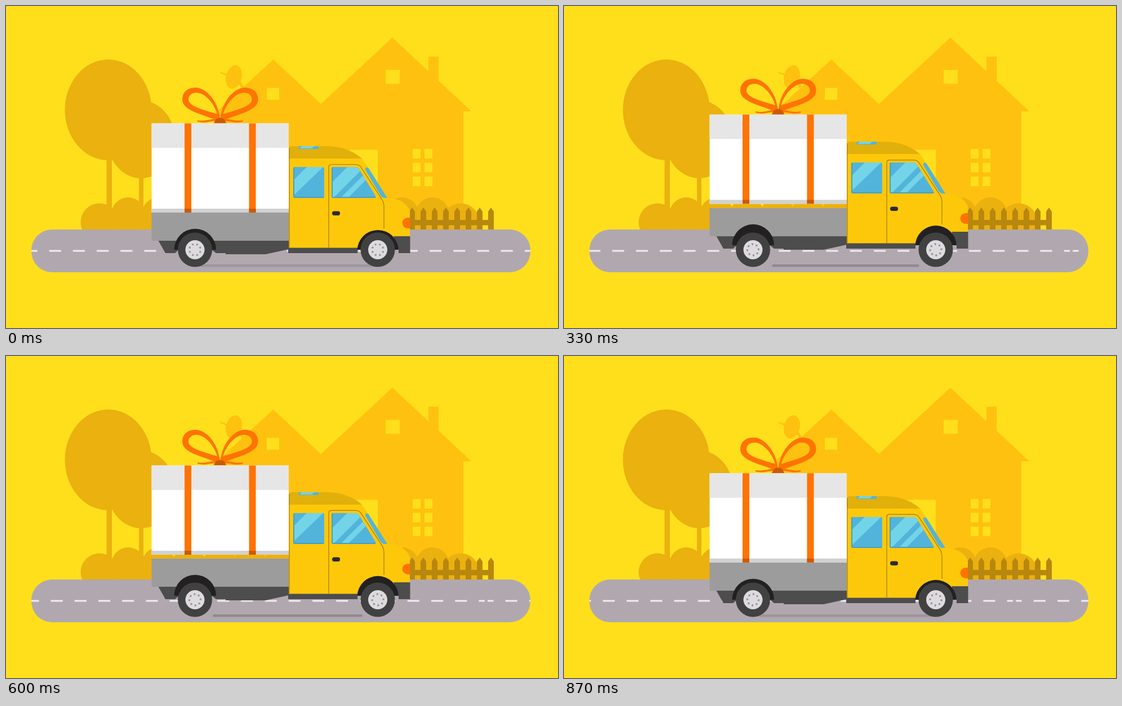
An HTML page for the animation above (0.9 s loop, 980 by 572 pixels).

```html
<!DOCTYPE html>
<html lang="en">
<head>
<meta charset="utf-8">
<title>Delivery truck</title>
<style>
  html, body { margin: 0; width: 100%; height: 100%; overflow: hidden; background: #ffdf1c; }
  svg { display: block; width: 980px; height: 572px; }
  .house { fill: #ffc10f; }
  .lit { fill: #ffdf1c; }
  .plant { fill: #eab10f; }
  .fence { fill: #b8870d; }
  .orange { fill: #ff7300; }
  .rust { fill: #cc5a00; }
  .dark { fill: #4d4d4d; }
  .arch { fill: #222021; }
  .body { fill: #fec80a; }
  .glass { fill: #52b4da; }
  .shine { fill: #73d4e8; }
  .seam { fill: none; stroke: #a17c0c; stroke-width: 1.2; }
  .dash { stroke: #f0ecf1; stroke-width: 3; }
</style>
</head>
<body>
<svg viewBox="0 0 980 572">
  <defs>
    <clipPath id="roadClip"><rect x="45" y="397" width="886" height="76" rx="37"/></clipPath>
    <clipPath id="rearClip"><rect x="510" y="286" width="55" height="55" rx="3"/></clipPath>
    <clipPath id="frontClip"><path id="frontPane" d="M581 286H619Q624 286 627 290L656 337Q658 341 654 341H581Q578 341 578 338V289Q578 286 581 286Z"/></clipPath>
    <g id="loop">
      <path class="orange" fill-rule="evenodd" d="M380 202C377 166 353 145 337 145C321 145 313 154 313 166C313 186 346 191 374 203Z
        M375 192C369 171 352 154 338 154C329 154 324 159 324 166C324 178 349 184 375 192Z"/>
      <path class="orange" d="M380 201C367 198 357 206 340 203Q339 205 342 206C358 209 366 202 380 205Z"/>
    </g>
    <g id="wheel">
      <circle r="30.5" fill="#414141"/>
      <circle r="17" fill="#dddbde"/>
    </g>
  </defs>

  <g class="house">
    <path d="M366 195L474.5 95L559 174L686 56L826 187H812V397H380V195Z"/>
    <rect x="750" y="90" width="18" height="50"/>
    <ellipse cx="404.5" cy="126" rx="14" ry="21" transform="rotate(14 404.5 126)"/>
    <path d="M381 117L393 121V124L380 119ZM413 138L417 135L424 146H418Z"/>
  </g>
  <g class="lit" id="panes">
    <rect x="463" y="145.500" width="22" height="21"/>
    <rect x="674" y="113.500" width="25" height="24.500"/>
    <rect x="600" y="255.500" width="60" height="100"/>
  </g>
  <g class="plant" id="plants">
    <ellipse cx="181.500" cy="184.500" rx="77" ry="89.500"/>
    <ellipse cx="240" cy="237" rx="60" ry="69"/>
    <rect x="178.500" y="260" width="9.500" height="120"/>
    <rect x="236" y="295" width="8" height="90"/>
    <circle cx="166" cy="384" r="33.500"/>
    <circle cx="807" cy="384" r="33.500"/>
    <rect x="140" y="370" width="690" height="27"/>
  </g>
  <g class="fence" id="fence"><rect x="716" y="380" width="150" height="9.500"/></g>

  <g clip-path="url(#roadClip)">
    <rect x="45" y="397" width="886" height="76" fill="#b1a8af"/>
    <g id="dashes">
      <path class="dash" d="M45 435H931.500"/>
      <path class="dash" d="M936.500 435H1823"/>
    </g>
  </g>
  <rect id="shadow" y="459" height="4.500" rx="1" fill="#8f8b90"/>

  <g id="truck">
    <path class="dark" d="M270 416H502V432L461 441H390V439H373L335 410L300 439H283Z"/>
    <rect x="258.500" y="367" width="243.500" height="50" fill="#9c9c9c"/>
    <path class="body" d="M502 430V255Q502 249 508 249H573Q608 250 632 271L643 287L677 341Q708 342 717 364V410H690L624 430Z"/>
    <path d="M502 271V255Q502 249 508 249H573Q608 250 632 271Z" fill="#e1b00a"/>
    <path class="seam" d="M503 252V429"/>
    <path class="dark" d="M501 429.500H624V439H501ZM688 409H717.500V439H697V433Z"/>
    <path class="orange" d="M717.500 376H713A9.500 9.500 0 0 0 713 395H717.500Z"/>
    <rect class="glass" x="519.500" y="249" width="35.500" height="5"/>
    <path class="shine" d="M525 249H547L543 253H521Z"/>
    <path class="seam" d="M573 429V286Q573 281.500 578 281.500H620Q627 281.500 630 286L667 343Q671 349 671 356V396"/>
    <g clip-path="url(#rearClip)">
      <rect class="glass" x="510" y="286" width="55" height="55"/>
      <path class="shine" d="M534 286H563L510 337V310Z"/>
      <path d="M511 286V340H565" fill="none" stroke="#459fc6" stroke-width="2"/>
    </g>
    <g clip-path="url(#frontClip)">
      <rect class="glass" x="578" y="286" width="82" height="55"/>
      <path class="shine" d="M606 286H626L631 291L581 341H578V314ZM636 299L641 307L607 341H594Z"/>
      <path d="M579 286V340H658" fill="none" stroke="#459fc6" stroke-width="2"/>
    </g>
    <path class="glass" d="M638 287H643L677 341H671Q667 340 664 335L638 291Z"/>
    <rect x="579" y="364.500" width="14" height="7.500" rx="3.500" fill="#2d292c"/>
    <path class="arch" d="M298.500 433a37 37 0 0 1 74.500 0ZM623.500 433a36.800 37 0 0 1 73.500 0Z"/>
  </g>

  <g id="gift">
    <use href="#loop"/>
    <use href="#loop" transform="matrix(-1 0 0 1 760.500 0)"/>
    <path class="rust" d="M369 209Q371 198.500 380 198.500T391 209Z"/>
    <rect x="258.500" y="208.500" width="243.500" height="158.500" fill="#fff"/>
    <rect x="258.500" y="208.500" width="243.500" height="43.500" fill="#e6e6e6"/>
    <rect x="258.500" y="360" width="243.500" height="7" fill="#d1d1d1"/>
    <path class="orange" d="M317 208.500H329V367H317ZM431.500 208.500H443.500V367H431.500Z"/>
    <path class="rust" d="M317 360H329V367H317ZM431.500 360H443.500V367H431.500Z"/>
  </g>

  <g id="wheels"></g>
</svg>
<script>
  const LOOP = 900, STEP = 30;
  const PERIOD = 886.5 / 21;
  const $ = id => document.getElementById(id);

  function add(parent, tag, attrs) {
    const el = document.createElementNS('http://www.w3.org/2000/svg', tag);
    for (const key in attrs) el.setAttribute(key, attrs[key]);
    return parent.appendChild(el);
  }

  for (const x of [722, 743])
    for (const y of [254, 278.5, 303])
      add($('panes'), 'rect', { x, y, width: 14, height: 17 });

  for (let i = 0; i <= 10; i++)
    add($('plants'), 'circle', { cx: 217 + 54 * i, cy: 370, r: 30 });

  for (let i = 0; i < 8; i++)
    add($('fence'), 'path', { d: `M${716 + 20 * i} 397v-32l5-7l5 7v32z` });

  // Each line starts and ends on half a dash.
  for (const line of document.querySelectorAll('.dash')) {
    line.setAttribute('stroke-dasharray', PERIOD / 2);
    line.setAttribute('stroke-dashoffset', PERIOD / 4);
  }

  const hubs = [335.5, 660].map(x => {
    const wheel = add($('wheels'), 'g', { transform: `translate(${x} 433)` });
    add(wheel, 'use', { href: '#wheel' });
    const hub = add(wheel, 'g', { fill: '#99959a' });
    for (let i = 0; i < 8; i++) {
      const a = (i + 0.5) * Math.PI / 4;
      add(hub, 'circle', { cx: 10 * Math.cos(a), cy: 10 * Math.sin(a), r: 1.8 });
    }
    return hub;
  });

  const smooth = x => x * x * (3 - 2 * x);
  // Distance driven while speed settles toward its limit.
  const travel = t => 0.202 * (t - 208 * (1 - Math.exp(-t / 208)));

  function draw(t) {
    const lift = smooth(1 - Math.abs(2 * t / LOOP - 1));
    const road = travel(t);
    const half = 155 - 30 * lift;
    $('truck').setAttribute('transform', `translate(0 ${-9.6 * lift})`);
    $('gift').setAttribute('transform', `translate(0 ${-19 * lift})`);
    $('dashes').setAttribute('transform', `translate(${-road} 0)`);
    $('shadow').setAttribute('x', 500 - half);
    $('shadow').setAttribute('width', 2 * half);
    $('shadow').setAttribute('opacity', Math.min(1, 0.6 + 0.8 * lift));
    const angle = road / 30.5 * 180 / Math.PI;
    for (const hub of hubs) hub.setAttribute('transform', `rotate(${angle})`);
  }

  const start = performance.now();
  function tick() {
    const t = (performance.now() - start) % LOOP;
    draw(Math.floor(t / STEP) * STEP);
    requestAnimationFrame(tick);
  }
  draw(0);
  requestAnimationFrame(tick);
</script>
</body>
</html>
```
